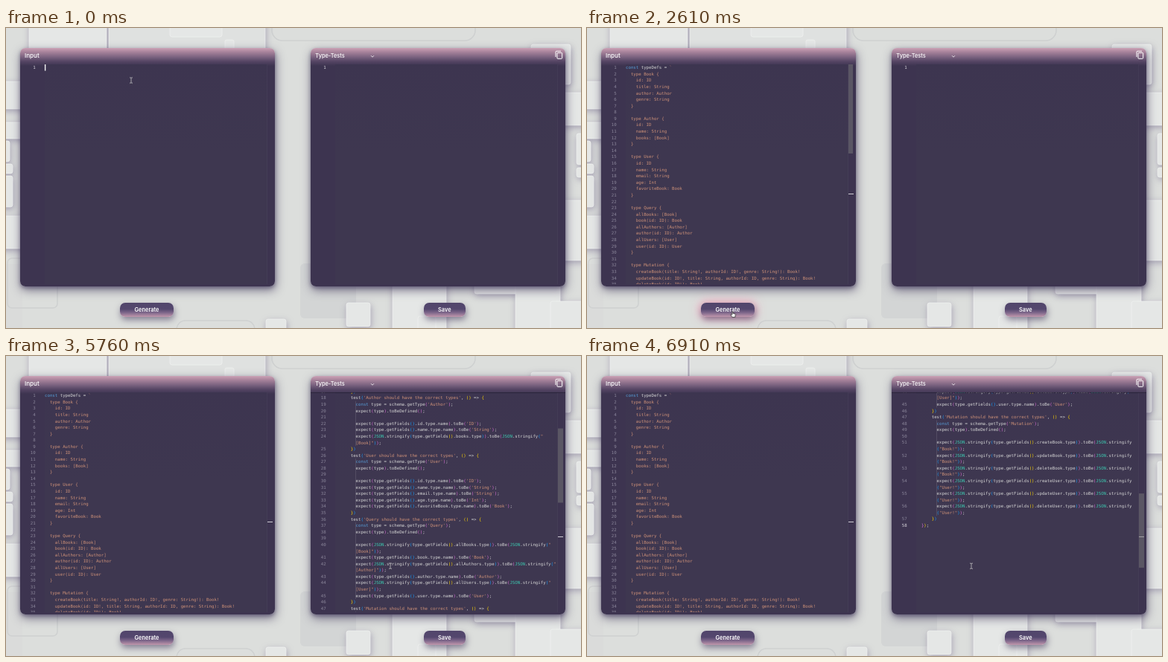
An HTML page for the animation above (6940 ms loop, 772 px wide and 404 px high).

```html
<!DOCTYPE html>
<html lang="en">
<head>
<meta charset="utf-8">
<title>Type-test generator</title>
<style>
@property --scroll { syntax: "<length>"; inherits: true; initial-value: 0px; }
html, body { margin: 0; width: 100%; height: 100%; overflow: hidden; }
body { background: #dcdedc; font-family: Inter, "Open Sans", sans-serif; }
#stage { position: relative; width: 772px; height: 404px; overflow: hidden; }
#stage * { box-sizing: border-box; animation-duration: 6.94s; animation-iteration-count: infinite; }
.scene { position: absolute; inset: 0; }
.scene .card { fill: #e5e7e6; stroke: #f1f2f1; stroke-width: .7; filter: drop-shadow(1px 3px 4px #71688c80); }
.scene .flat { fill: #d3d5d5; }
.scene .ring { fill: none; stroke: #cfd1d1; stroke-width: 1.6; }

.panel {
  position: absolute; top: 27px; width: 342.5px; height: 321px; border-radius: 7px; overflow: hidden;
  background: linear-gradient(#cba1b5 0, #a9849c 5px, #7b6380 12px, #554564 18px, #3d3450 24px);
}
.shade { position: absolute; top: 27px; width: 342.5px; height: 321px; border-radius: 7px; box-shadow: 1px 5px 13px #40365aa8, 0 2px 4px #40365a70; }
.left { left: 18.5px; }
.right { left: 408.8px; }
.title { position: absolute; left: 6.5px; top: 4px; line-height: 12px; color: #fff; font-weight: 500; white-space: nowrap; }
.icon { position: absolute; fill: none; stroke: #fff; }
.editor { position: absolute; left: 0; top: 21.9px; width: 342.5px; height: 296.2px; overflow: hidden; }
.tint { position: absolute; inset: 0 10px 0 33px; background: linear-gradient(#3d3550, #3e3750 40%); border-right: 1px solid #ffffff08; }

.layer { position: absolute; inset: 0; }
.code {
  position: absolute; left: 0; top: 0; width: 720px; transform-origin: 0 0;
  transform: translateY(calc(var(--scroll) * -1)) scale(.477);
  font: 12px/18px "DejaVu Sans Mono", Menlo, monospace; color: #d4d4d4; text-rendering: geometricPrecision;
}
.row { position: relative; height: 18px; padding-left: 69.2px; white-space: pre; }
.num { position: absolute; left: 0; width: 43.4px; text-align: right; color: #8b869a; }
.num.on { color: #d6d4da; }
.guide { position: absolute; left: 69.2px; top: 0; height: 18px; background: repeating-linear-gradient(90deg, #ffffff30 0 1px, transparent 1px 14.45px); }
.caret { position: absolute; width: 2.4px; height: 18px; background: #f2f2f2; }
.key { color: #569cd6; } .str { color: #ce9178; } .note { color: #6a9955; } .type { color: #3dc9b0; } .dim { opacity: .67; }
.d0 { color: #ffd700; } .d1 { color: #da70d6; } .d2 { color: #179fff; }
.edge { position: absolute; left: 0; top: 0; width: 100%; height: min(1.6px, var(--scroll)); background: #1c172a90; }
.thumb { position: absolute; left: 332.3px; top: 0; width: 6.6px; background: #79797980; }
.mark { position: absolute; left: 332.3px; width: 7px; height: 1.3px; background: #cfccd4; }

.button {
  position: absolute; top: 370px; height: 19px; border-radius: 7px; color: #fff; text-align: center;
  font-size: 7.4px; font-weight: 600; line-height: 19px;
  background: linear-gradient(#51456b 0, #54476e 45%, #7d668a 70%, #c097ac 100%);
  box-shadow: 1px 4px 8px #40365a90;
}
.glow { position: absolute; left: 153px; top: 370px; width: 72px; height: 19px; border-radius: 7px; box-shadow: 0 0 13px 2px #ff93b4b0; animation: glow linear; }
.mouse { position: absolute; left: 0; top: 0; animation: move linear; }
.mouse svg { position: absolute; overflow: visible; left: 0; top: 0; width: 1px; height: 1px; }
.beam { animation: beam step-end; }
.arrow { animation: arrow step-end; }
.hand { animation: hand step-end; }

.left .blank { animation: leave-left step-end; }
.left .filled { animation: enter-left step-end; }
.right .blank { animation: leave-right step-end; }
.right .filled { animation: enter-right step-end; }
.left.panel { animation: scroll-left linear; }
.right.panel { animation: scroll-right linear; }
.left .thumb { height: 120.5px; transform: translateY(calc(var(--scroll) * .411)); animation: thumb-left linear; }
.right .thumb { height: 100.5px; transform: translateY(calc(var(--scroll) * .34)); animation: thumb-right linear; }
.filled .caret { animation: blur step-end; }

@keyframes leave-left { 0% { visibility: visible } 19.164%, 100% { visibility: hidden } }
@keyframes enter-left { 0% { visibility: hidden } 19.164%, 100% { visibility: visible } }
@keyframes leave-right { 0% { visibility: visible } 45.389%, 100% { visibility: hidden } }
@keyframes enter-right { 0% { visibility: hidden } 45.389%, 100% { visibility: visible } }
@keyframes blur { 0% { opacity: 1 } 38.905%, 100% { opacity: 0 } }
@keyframes scroll-left {
  0%, 19.163% { --scroll: 0px }
  19.164% { --scroll: 149.4px }
  20.893% { --scroll: 149.4px; animation-timing-function: ease-in-out }
  26.657%, 100% { --scroll: 0px }
}
@keyframes scroll-right {
  0% { --scroll: 0px }
  75.648% { --scroll: 0px; animation-timing-function: cubic-bezier(.3, 0, .8, .8) }
  82.997% { --scroll: 142.4px }
  91.643% { --scroll: 336.4px; animation-timing-function: cubic-bezier(.2, .6, .4, 1) }
  99.568%, 100% { --scroll: 400.4px }
}
@keyframes thumb-left { 0%, 19.163% { opacity: 0 } 19.164%, 38.905% { opacity: 1 } 48.991%, 100% { opacity: 0 } }
@keyframes thumb-right {
  0%, 45.388% { opacity: 0 }
  45.389%, 52.594% { opacity: 1 }
  64.121%, 66.282% { opacity: 0 }
  67.723%, 100% { opacity: 1 }
}
@keyframes glow { 0%, 34.87% { opacity: 0 } 37.2%, 59.15% { opacity: 1 } 67%, 100% { opacity: 0 } }
@keyframes move {
  0% { transform: translate(168px, 70.5px) }
  11.816% { transform: translate(168px, 70.5px); animation-timing-function: ease-in-out }
  16.571% { transform: translate(190.3px, 169px) }
  28.818% { transform: translate(190.3px, 169px); animation-timing-function: ease-in-out }
  36.311% { transform: translate(195.5px, 382px) }
  57.349% { transform: translate(195.5px, 382px); animation-timing-function: ease-in }
  60.231% { transform: translate(225px, 353px); animation-timing-function: ease-out }
  67.723%, 100% { transform: translate(516px, 282.8px) }
}
@keyframes beam {
  0% { visibility: visible }
  34.078% { visibility: hidden }
  60.519% { visibility: visible }
  62.464% { visibility: hidden }
  63.401%, 100% { visibility: visible }
}
@keyframes arrow {
  0% { visibility: hidden }
  34.078% { visibility: visible }
  34.87% { visibility: hidden }
  59.15% { visibility: visible }
  60.519% { visibility: hidden }
  62.464% { visibility: visible }
  63.401%, 100% { visibility: hidden }
}
@keyframes hand { 0% { visibility: hidden } 34.87% { visibility: visible } 59.15%, 100% { visibility: hidden } }
</style>
</head>
<body>
<div id="stage">
  <svg class="scene" width="772" height="404">
    <rect class="flat" x="395" y="317" width="75" height="74" rx="6"/>
    <rect class="ring" x="357" y="-30" width="273" height="47" rx="14"/>
    <rect class="ring" x="229" y="394" width="105" height="40" rx="12"/>
    <g class="card">
      <rect x="138" y="-20" width="210" height="60" rx="4" fill="#dfe1e0"/>
      <rect x="31" y="-12" width="104" height="60" rx="4"/>
      <rect x="220" y="-12" width="70" height="24" rx="3"/>
      <rect x="294" y="16" width="12" height="22" rx="2"/>
      <rect x="-8" y="72" width="40" height="37" rx="3"/>
      <rect x="-8" y="127" width="40" height="22" rx="3"/>
      <rect x="-8" y="152" width="13" height="28" rx="3"/>
      <rect x="-8" y="183" width="17" height="13" rx="3"/>
      <rect x="-8" y="199" width="17" height="42" rx="3"/>
      <rect x="-8" y="253" width="40" height="44" rx="3"/>
      <rect x="705" y="22" width="53" height="54" rx="3"/>
      <rect x="735" y="87" width="50" height="44" rx="3"/>
      <rect x="766" y="142" width="16" height="42" rx="3"/>
      <rect x="766" y="188" width="16" height="13" rx="3"/>
      <rect x="735" y="232" width="50" height="81" rx="3"/>
      <rect x="519" y="330" width="72" height="90" rx="3"/>
      <rect x="629" y="330" width="61" height="28" rx="3"/>
      <rect x="684" y="342" width="60" height="80" rx="3"/>
      <rect x="731" y="368" width="50" height="50" rx="3"/>
      <rect x="553" y="388" width="24" height="26" rx="3"/>
      <rect x="457" y="370" width="32" height="32" rx="3"/>
      <rect x="349" y="392" width="27" height="24" rx="3"/>
    </g>
    <rect class="flat" x="-8" y="318" width="30" height="100" opacity=".3"/>
    <rect class="ring" x="2" y="310" width="67" height="67" rx="6"/>
  </svg>

  <div class="shade left"></div>
  <div class="shade right"></div>

  <div class="panel left">
    <div class="title" style="font-size:8.1px">Input</div>
    <div class="editor">
      <div class="tint"></div>
      <div class="layer blank"><div class="code"></div></div>
      <div class="layer filled"><div class="code" id="schema"></div><div class="mark" style="top:174.3px"></div></div>
      <div class="thumb"></div><div class="edge"></div>
    </div>
  </div>

  <div class="panel right">
    <div class="title" style="font-size:7.4px;top:5px">Type-Tests</div>
    <svg class="icon" style="left:80px;top:9px" width="6" height="5" stroke-width=".8"><path d="M1 1.2 3 3.2 5 1.2"/></svg>
    <svg class="icon" style="left:328px;top:3px" width="12" height="13" stroke-width="1"><path d="M1 9V2.2Q1 1.2 2 1.2H8"/><rect x="3" y="3.3" width="6.6" height="8" rx=".8"/></svg>
    <div class="editor">
      <div class="tint"></div>
      <div class="layer blank"><div class="code"></div></div>
      <div class="layer filled"><div class="code" id="tests"></div><div class="mark" style="top:194.3px"></div></div>
      <div class="thumb"></div><div class="edge"></div>
    </div>
  </div>

  <div class="glow"></div>
  <div class="button" style="left:153px;width:72px">Generate</div>
  <div class="button" style="left:560.5px;width:56.5px">Save</div>

  <div class="mouse">
    <svg class="beam" fill="none"><path d="M-2-3.8Q0-3.8 0-2.8Q0-3.8 2-3.8M0-2.8V2.8M-2 3.8Q0 3.8 0 2.8Q0 3.8 2 3.8" stroke="#221c30" stroke-width="1.6"/><path d="M-2-3.8Q0-3.8 0-2.8Q0-3.8 2-3.8M0-2.8V2.8M-2 3.8Q0 3.8 0 2.8Q0 3.8 2 3.8" stroke="#e4e2e8" stroke-width=".8"/></svg>
    <svg class="arrow"><path d="M0 0V7.4L1.7 5.9 2.8 8.3 4 7.8 2.9 5.4H5.2Z" fill="#111" stroke="#fff" stroke-width=".6"/></svg>
    <svg class="hand"><path d="M-.8 4.2V0Q0-1 .7 0V2.4L3.4 3Q4 3.2 3.9 4L3.3 7.4H-.6L-2.6 4.2Q-2.3 3.2-.8 4.2Z" fill="#fff" stroke="#111" stroke-width=".7"/></svg>
  </div>
</div>

<script>
const WRAP = '¬';
const CHAR = 7.224;

const schema = `const typeDefs = \`
  type Book {
    id: ID
    title: String
    author: Author
    genre: String
  }

  type Author {
    id: ID
    name: String
    books: [Book]
  }

  type User {
    id: ID
    name: String
    email: String
    age: Int
    favoriteBook: Book
  }

  type Query {
    allBooks: [Book]
    book(id: ID): Book
    allAuthors: [Author]
    author(id: ID): Author
    allUsers: [User]
    user(id: ID): User
  }

  type Mutation {
    createBook(title: String!, authorId: ID!, genre: String!): Book!
    updateBook(id: ID!, title: String, authorId: ID, genre: String): Book!
    deleteBook(id: ID!): Book!
    createUser(
      name: String!
      email: String!
      age: Int
      favoriteBookId: ID
    ): User!
    updateUser(
      id: ID!
      name: String
      email: String
      age: Int
      favoriteBookId: ID
    ): User!
    deleteUser(id: ID!): User!
  }
\`;`;

const pad = ' '.repeat(8);

function check(field) {
  const [name, type] = field.split(':');
  const get = `type.getFields().${name}.type`;
  if (/^\w+$/.test(type)) return `${pad}expect(${get}.name).toBe('${type}');`;
  const arg = type.endsWith('!') ? `${WRAP}${pad}("${type}"` : `("${WRAP}${pad}${type}"`;
  return `${pad}expect(JSON.stringify(${get})).toBe(JSON.stringify${arg}));`;
}

function testCase(spec) {
  const [name, ...fields] = spec.split(' ');
  return `      test('${name} should have the correct types', () => {
${pad}const type = schema.getType('${name}');
${pad}expect(type).toBeDefined();

${fields.map(check).join('\n')}
      })`;
}

const tests = `//> npm install graphql-tools @jest/globals jest babel-jest
//> for typescript tests, npm install ts-jest @types/jest
import {describe, expect, test} from '@jest/globals';
const { makeExecutableSchema, addMocksToSchema } = require('graphql-tools');
const typeDefs = require(/* schema file */)

describe('Schema Types Are Correct', () => {
  const schema = makeExecutableSchema({ typeDefs });
${[
  'Book id:ID title:String author:Author genre:String',
  'Author id:ID name:String books:[Book]',
  'User id:ID name:String email:String age:Int favoriteBook:Book',
  'Query allBooks:[Book] book:Book allAuthors:[Author] author:Author allUsers:[User] user:User',
  'Mutation createBook:Book! updateBook:Book! deleteBook:Book! createUser:User! updateUser:User! deleteUser:User!',
].map(testCase).join('\n')}
  });`;

const TOKEN = /(\/\/.*|\/\*.*?\*\/)|('[^']*'|"[^"]*"|`[^`]*`)|\b(const|import|from)\b|\b(addMocksToSchema)\b|\b([A-Z]\w*)|([()[\]{}])|\w+/g;

function highlight(src) {
  let depth = 0;
  return src.replace(TOKEN, (text, note, str, key, dim, type, bracket) => {
    let kind = note ? 'note' : str ? 'str' : key ? 'key' : dim ? 'dim' : type ? 'type' : '';
    if (bracket) kind = 'd' + ('([{'.includes(bracket) ? depth++ : --depth) % 3;
    if (!kind) return text;
    // Close and reopen the span at every line end.
    return text.split(/([\n¬])/).map((s, i) => i % 2 ? s : `<span class="${kind}">${s}</span>`).join('');
  });
}

function render(el, src) {
  const raw = src.split('\n');
  const painted = highlight(src).split('\n');
  const indent = i => raw[i].trim() ? raw[i].search(/\S/) : indent(i + 1);
  el.innerHTML = painted.map((line, i) => line.split(WRAP).map((html, part) => {
    const num = part ? '' : `<span class="num${i === raw.length - 1 ? ' on' : ''}">${i + 1}</span>`;
    const guide = `<span class="guide" style="width:${indent(i) * CHAR}px"></span>`;
    return `<div class="row">${num}${guide}${html}</div>`;
  }).join('')).join('');
}

function addCaret(el, line, col) {
  const caret = document.createElement('div');
  caret.className = 'caret';
  caret.style.left = 69.2 + col * CHAR + 'px';
  caret.style.top = line * 18 + 'px';
  el.append(caret);
}

const el = id => document.getElementById(id);
for (const blank of document.querySelectorAll('.blank .code'))
  blank.innerHTML = '<div class="row"><span class="num on">1</span></div>';
render(el('schema'), schema);
render(el('tests'), tests);
addCaret(document.querySelector('.left .blank .code'), 0, 0);
addCaret(el('schema'), 50, 2);
</script>
</body>
</html>
```
